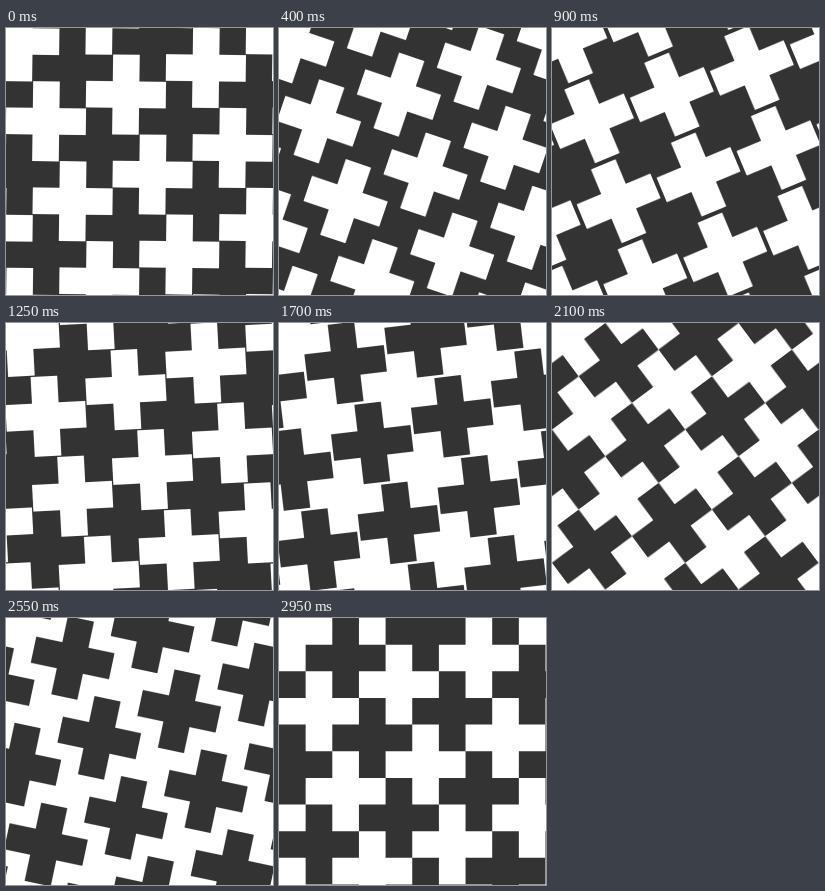
An HTML page with a canvas that plays this animation: 267x267 px, repeating every 3000 ms.

```html
<!DOCTYPE html>
<html lang="en">
<head>
<meta charset="utf-8">
<title>Turning crosses</title>
<style>
  html, body { margin: 0; width: 100%; height: 100%; overflow: hidden; background: #333; }
  canvas { display: block; width: 100vw; height: 100vh; }
</style>
</head>
<body>
<canvas id="stage" width="267" height="267"></canvas>
<script>
const ctx = document.getElementById('stage').getContext('2d');
const SIZE = 267, UNIT = 26.65;
const STEP = 50, HALF = 30;
const SAMPLES = 5, SHUTTER = 0.5;
const DARK = '#333', LIGHT = '#fff';

const ease = p => p < 0.5 ? 2 * p * p : 1 - 2 * (1 - p) * (1 - p);

// One cross: a long upright bar with two side arms, as a single outline.
function addCross(path, cx, cy, angle) {
  const a = UNIT / 2, b = UNIT * 1.5;
  const corners = [[-a, -b], [a, -b], [a, -a]];
  const c = Math.cos(angle), s = Math.sin(angle);
  for (let side = 0; side < 4; side++) {
    corners.forEach(([px, py], i) => {
      let x = px, y = py;
      for (let n = 0; n < side; n++) [x, y] = [-y, x];
      const X = cx + x * c - y * s, Y = cy + x * s + y * c;
      if (side + i === 0) path.moveTo(X, Y);
      else path.lineTo(X, Y);
    });
  }
  path.closePath();
}

// Crosses sit on the lattice spanned by (3, -1) and (1, 3).
function drawField(back, front, ox, oy, angle) {
  const path = new Path2D();
  for (let i = -5; i <= 5; i++) {
    for (let j = -5; j <= 5; j++) {
      const x = (ox + 3 * i + j) * UNIT, y = (oy - i + 3 * j) * UNIT;
      if (Math.min(x, y) > -50 && Math.max(x, y) < SIZE + 50) addCross(path, x, y, angle);
    }
  }
  ctx.fillStyle = back;
  ctx.fillRect(0, 0, SIZE, SIZE);
  ctx.fillStyle = front;
  ctx.fill(path);
}

const layer = document.createElement('canvas');
layer.width = layer.height = SIZE;
const view = ctx;

function render(step) {
  const k = step % HALF, lightTurn = step < HALF;
  for (let n = 0; n < SAMPLES; n++) {
    const shift = ((n + 0.5) / SAMPLES - 0.5) * SHUTTER;
    const p = Math.min(1, (k + 2 + shift) / (HALF + 1));
    const angle = ease(p) * Math.PI / 2;
    blend(n, () => lightTurn
      ? drawField(DARK, LIGHT, 4.5, 2.5, angle)
      : drawField(LIGHT, DARK, 2.5, 1.5, -angle));
  }
}

// Averages the samples of one step into a soft motion blur.
function blend(n, draw) {
  if (n) {
    const soft = layer.getContext('2d');
    soft.globalAlpha = 1;
    soft.drawImage(view.canvas, 0, 0);
  }
  draw();
  if (n) {
    view.globalAlpha = n / (n + 1);
    view.drawImage(layer, 0, 0);
    view.globalAlpha = 1;
  }
}

const start = performance.now();
let shown = -1;
function tick() {
  const time = Math.max(0, performance.now() - start);
  const step = Math.floor(time / STEP) % (HALF * 2);
  if (step !== shown) render(shown = step);
  requestAnimationFrame(tick);
}
tick();
</script>
</body>
</html>
```
